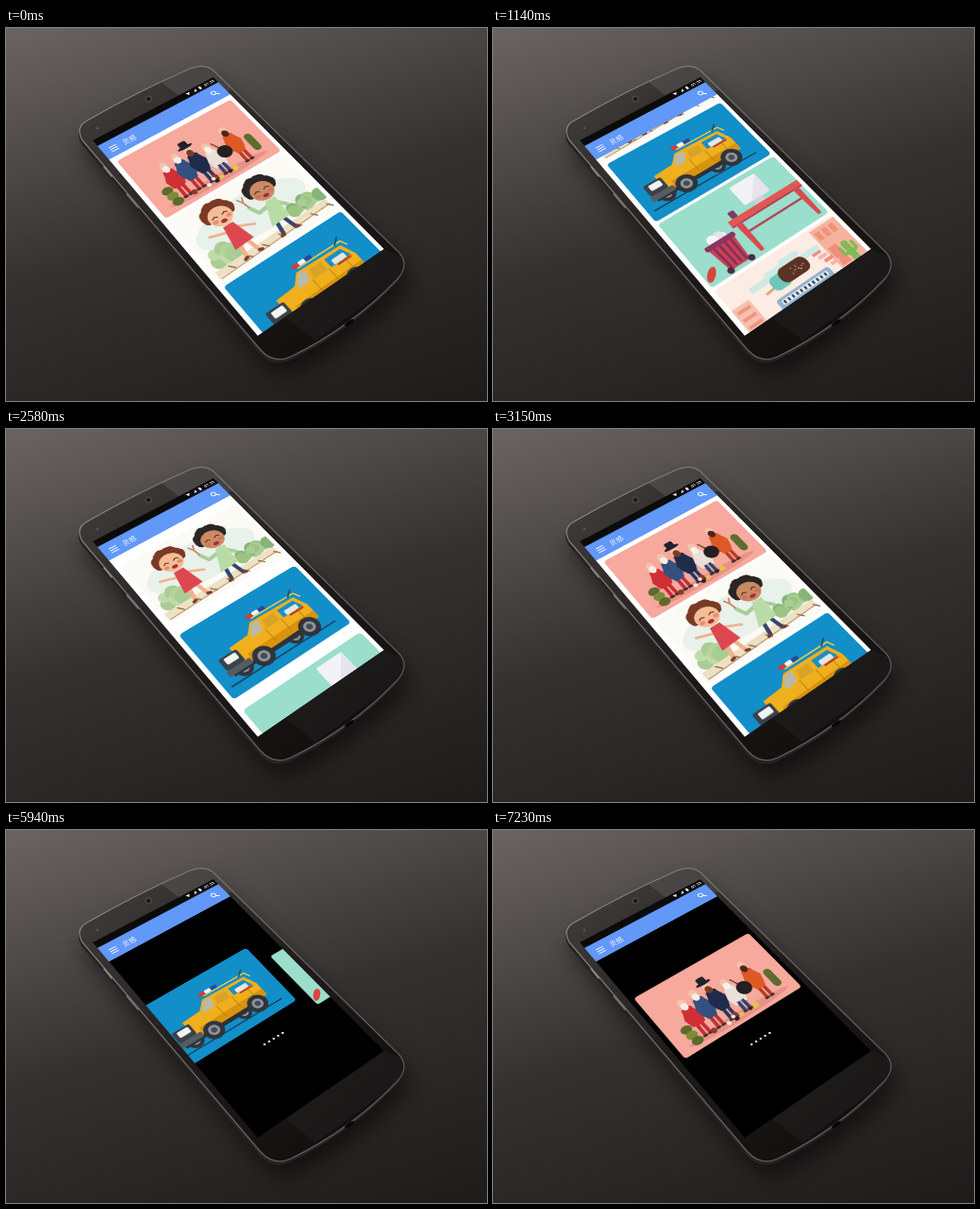
These frames come from a looping animation (510 by 395 pixels, 7.29 s). An HTML page with a canvas:

```html
<!DOCTYPE html>
<html lang="zh">
<head>
<meta charset="utf-8">
<style>
html, body { margin: 0; width: 100%; height: 100%; overflow: hidden; background: #34312f; }
canvas { position: absolute; left: 0; top: 0; display: block; }
#screen { transform-origin: 0 0; }
</style>
</head>
<body>
<canvas id="stage" width="510" height="395"></canvas>
<canvas id="screen" width="225" height="400"></canvas>
<script>
const LOOP = 7290, STEP = 30;
const W = 360, H = 640, ZOOM = 0.625;
const UNIT = 3.37, CARD_H = 203, TOP = 86, PITCH = 209.3, SCROLL = 407, CENTER = 312.5;
const BOTH = [-1, 1];
const screenEl = document.getElementById('screen');
let c = document.getElementById('stage').getContext('2d');

// drawing helpers
function box(col, x, y, w, h, r = 0) {
  c.fillStyle = col;
  c.beginPath();
  c.roundRect(x, y, w, h, r);
  c.fill();
}
function oval(col, x, y, rx, ry = rx, rot = 0) {
  c.fillStyle = col;
  c.beginPath();
  c.ellipse(x, y, rx, ry, rot, 0, 7);
  c.fill();
}
function trace(p) {
  c.beginPath();
  for (let i = 0; i < p.length; i += 2) c.lineTo(p[i], p[i + 1]);
}
function poly(col, ...p) {
  trace(p);
  c.fillStyle = col;
  c.fill();
}
function line(col, w, ...p) {
  trace(p);
  c.strokeStyle = col;
  c.lineWidth = w;
  c.lineCap = c.lineJoin = 'round';
  c.stroke();
}
function times(n, f) {
  for (let i = 0; i < n; i++) f(i);
}
function gradient(x0, y0, x1, y1, ...cols) {
  const g = c.createLinearGradient(x0, y0, x1, y1);
  cols.forEach((col, i) => g.addColorStop(i / (cols.length - 1), col));
  return g;
}
function random(seed) {
  return () => (seed = seed * 16807 % 2147483647) / 2147483647;
}
function scatter(cols, n, seed, x, y, rx, ry, size) {
  const rnd = random(seed);
  times(n, i => {
    const a = rnd() * 7, d = Math.sqrt(rnd());
    oval(cols[i % cols.length], x + rx * d * Math.cos(a), y + ry * d * Math.sin(a), size * (0.7 + 0.6 * rnd()));
  });
}

// phone
function bodyPath() {
  c.beginPath();
  c.moveTo(81, 119);
  c.quadraticCurveTo(73, 105, 86, 98);
  c.quadraticCurveTo(140, 67, 195, 43);
  c.quadraticCurveTo(212, 36, 222, 47);
  c.lineTo(417, 238);
  c.quadraticCurveTo(428, 251, 415, 266);
  c.quadraticCurveTo(366, 317, 302, 348);
  c.quadraticCurveTo(284, 356, 270, 341);
  c.closePath();
}
function drawPhone() {
  c.fillStyle = gradient(0, 0, 158, 502, '#6a6562', '#34312f', '#1e1c1b');
  c.fillRect(0, 0, 510, 395);

  c.save();
  c.shadowColor = 'rgba(0,0,0,.55)';
  c.shadowBlur = 24;
  c.shadowOffsetX = 6;
  c.shadowOffsetY = 12;
  c.translate(-1, 4);
  bodyPath();
  c.fillStyle = '#262322';
  c.fill();
  c.restore();

  bodyPath();
  c.fillStyle = gradient(130, 60, 350, 330, '#3d3937', '#1f1c1b', '#12100f');
  c.fill();
  c.save();
  c.clip();
  poly('rgba(255,255,255,.09)', 163, 56, 184, 72, 240, 66, 207, 30);
  poly('rgba(255,255,255,.03)', 296, 306, 328, 331, 440, 250, 401, 234);
  c.restore();
  bodyPath();
  c.strokeStyle = gradient(75, 100, 425, 270, '#8c8784', '#6b6765', '#5c5856');
  c.lineWidth = 1.2;
  c.stroke();

  line('#8d8986', 1.6, 104, 147, 112, 157);
  line('#777371', 1.6, 128, 176, 140, 190);
  oval('#4a4644', 151, 75, 4, 3.4);
  oval('#191718', 151, 75, 2.4, 2);
  oval('#575250', 97, 106, 1.5);
  oval('#050505', 364, 312, 6, 1.8, -0.6);
}

// card illustrations on a 100 x 60 field
function man(x, head, coat, legs, beard) {
  for (const s of BOTH) {
    line(legs, 2.6, x + s * 1.8, 41, x + s * 2, 51);
    box('#4a2a2a', x + s * 2.1 - 1.9, 52, 3.8, 2, 1);
    line(coat, 2.4, x + s * 3, head + 8, x + s * 5.5, head + 14, x + s * 4, head + 20);
  }
  box(coat, x - 4.2, head + 5, 8.4, 39 - head, 2);
  oval('#f2c4a8', x, head + 1, 3, 3.8);
  oval(beard, x, head + 4, 2.6, 3.2);
}
function party() {
  box('#f6a99c', 0, 0, 100, 60);
  oval('rgba(196,92,84,.3)', 50, 54, 42, 3.5);
  man(24, 22, '#cf2f35', '#c92b33', '#f4eeea');
  man(35, 20, '#34507f', '#b8333a', '#f4eeea');
  man(46, 20, '#1f2b4a', '#27395f', '#7b3b22');
  man(58, 25, '#e9e1d8', '#2c4670', '#f7f2ee');
  man(77, 20, '#dd5a26', '#b93a24', '#4f241b');
  oval('#22202a', 46, 17.5, 6, 1.4);
  box('#22202a', 42.8, 12, 6.4, 5.5, 1.5);
  line('#7a4a30', 1.2, 63, 26, 67, 36);
  oval('#231f22', 67, 37, 5.6);
  box('#5d6c2f', 85.5, 33, 6, 17, 3);
  times(3, i => oval(i % 2 ? '#7c8b3a' : '#5c6b2c', 14 + i * 0.6, 42 + i * 5.6, 4.2, 3.4));
  scatter(['#e8c14c', '#f1ede6', '#2a2426', '#8a3a2c'], 8, 5, 48, 53, 20, 2, 2);
}

function kid(x, hip, hair, skin, shirt, legs) {
  for (const s of BOTH) {
    line(legs, 3, hip + s * 3, 43, hip + s * 5, 53);
    line('#7c3c30', 2.4, hip + s * 5, 54, hip + s * 7, 54.5);
  }
  poly(shirt, x - 4, 26, x + 4, 26, hip + 8, 44, hip - 8, 45);
  times(13, i => {
    const a = Math.PI * (0.95 + i * 0.092);
    oval(hair, x + 9 * Math.cos(a), 15 + 7.5 * Math.sin(a), 3.4 + i % 3 * 0.5);
  });
  oval(skin, x, 17.5, 9, 8);
  for (const s of BOTH) {
    oval('rgba(226,90,80,.5)', x + s * 5.5, 20, 2, 1.5);
    line('#5d2b1d', 0.8, x + s * 4 - 2, 17, x + s * 4, 16, x + s * 4 + 2, 17);
  }
  oval('#a52f34', x, 22, 2.4, 1.5);
}
function friends() {
  box('#fbfaf5', 0, 0, 100, 60);
  oval('#e8f1ea', 50, 28, 45, 17);
  scatter(['#b4d39a', '#a9cd94', '#c0dba8'], 14, 3, 15, 43, 9, 7, 5);
  scatter(['#a9cd94', '#86b57a', '#9bc483'], 16, 8, 85, 42, 13, 4, 4.5);
  poly('#eee0c2', 2, 51, 98, 48, 98, 53, 2, 57);
  line('#b08f63', 0.7, 3, 57, 98, 53);
  times(7, i => line('#8f6d48', 1, 12 + i * 14, 52, 15 + i * 14, 55.5));
  line('#f0b28c', 2, 15, 27, 27, 31, 36, 31, 46, 36);
  kid(31, 31, '#7a3a24', '#f4bd98', '#dd4850', '#f0b28c');
  line('#a9cf96', 3, 74, 36, 68, 29, 54, 31, 51, 24);
  for (const s of BOTH) line('#c58662', 1.2, 51, 23, 50, 18, 50 + s * 2, 14);
  kid(67, 62, '#2b2524', '#c98a65', '#b9dba6', '#34466b');
}

function wheel(x, y, r) {
  oval('#30343a', x, y, r);
  oval('#8f959a', x, y, r * 0.56);
  oval('#454b52', x, y, r * 0.3);
}
function truck() {
  box('#128ec8', 0, 0, 100, 60);
  line('#16364d', 0.9, 5, 52, 92, 52.5);
  c.translate(-5.5, 0);
  c.scale(1.06, 1.03);
  wheel(24, 44, 6);
  wheel(64, 45, 5.5);
  poly('#2d3238', 14, 36, 34, 38, 82, 40, 82, 46, 16, 46);
  poly('#f0b01d', 25, 27, 40, 26, 47, 19, 82, 20, 86, 30, 86, 42, 31, 43, 25, 38);
  poly('#d9930f', 32, 37, 86, 36, 86, 42, 31, 43);
  poly('#bcb9a4', 42, 26, 47, 20.5, 53, 20.5, 50, 29, 42, 29);
  poly('#d9a32a', 55, 22, 64, 22, 64, 29, 53, 29);
  poly('#198fc4', 67, 22, 80, 22, 83, 29, 67, 29);
  box('#e2e7e8', 70, 25, 10, 4, 1);
  line('#f7cf45', 1, 50, 17, 84, 17.5, 86, 22);
  times(3, i => {
    box(['#d83a34', '#f4f4f4', '#29479e'][i], 47 + i * 5, 13.5, 5, 3, 0.8);
    line('#b9820f', 0.6, 52 + i * 13, 29, 52 + i * 13, 40);
  });
  line('#b83a33', 1.4, 72, 30, 82, 30);
  line('#2d4b4a', 1, 79, 18, 84, 14);
  box('#3a4148', 14, 30, 14, 10, 1.5);
  box('#f2f4f2', 17, 31.5, 9, 5, 1);
  box('#555c63', 13, 40, 18, 4.5, 1);
  for (const x of [39, 76]) wheel(x, 44.5, 7.4);
}

function office() {
  box('#9adecb', 0, 0, 100, 60);
  box('#f3f2f6', 57, 4, 22, 18, 1.5);
  poly('#e6e5ed', 79, 4, 79, 22, 63, 22);
  box('#cfd0da', 64, 22, 8, 4);
  box('#7a3d68', 43, 20, 5, 6, 1);
  box('#e2574f', 39, 26, 61, 4.5, 0.5);
  box('#b93f57', 39, 30.5, 61, 1.6);
  for (const x of [42, 92]) poly('#d84b4f', x, 31, x + 5, 31, x + 4, 57, x + 1, 57);
  line('#b93f57', 1.6, 47, 40, 92, 40);
  scatter(['#f7f5f8', '#e7e2ec'], 7, 4, 25, 32, 7, 2, 3.5);
  poly('#c93f55', 15, 36, 36, 36, 34, 57, 18, 57);
  times(4, i => line('#7b2f5c', 1.6, 19 + i * 4.5, 38, 20 + i * 4, 55));
  box('#8c3462', 13.5, 33.5, 24, 4, 1.5);
  for (const x of [18, 35]) oval('#4d2749', x, 57, 2.5);
  oval('#d9443f', 6, 52, 6, 2.8, -0.75);
}

function street() {
  box('#fdece4', 0, 0, 100, 60);
  box('#f5b39e', 78, 2, 22, 34);
  times(3, i => box('#ef937d', 80 + i * 6, 5, 4, 7));
  box('#ef8f7b', 80, 19, 7, 16);
  times(4, i => box(i % 2 ? '#f6b6a4' : '#ee8e7a', 68 + i * 2, 16 + i * 4, 7, 2.6));
  box('#f7bfae', 0, 18, 14, 40);
  times(6, i => box('#ee9681', 2, 21 + i * 6, 10, 2.4));
  times(4, i => box('#cdeae3', 18 + i * 14, 12 - i % 3 * 2.5, 16, 4.5, 2.2));
  line('#d9a877', 1.8, 26, 22, 34, 21);
  box('#6fc7b9', 32, 14, 14, 11, 4);
  box('#5a3226', 40, 12, 23, 12, 5);
  scatter(['#e9a0a0', '#f2d9b0'], 10, 6, 52, 18, 8, 4, 0.5);
  box('#8fb2cf', 27, 29, 44, 10, 2);
  box('#eef4f7', 30, 31, 38, 3.6, 1);
  times(11, i => box('#3f4858', 31 + i * 3.4, 31.6, 1.6, 2.4));
  box('#ee8e7a', 24, 39, 50, 21);
  times(6, i => box('#fbdccf', 27 + i * 8, 42, 4, 16));
  box('#7dbb54', 89, 20, 5, 19, 2.5);
  for (const s of BOTH) line('#7dbb54', 2.4, 91.5, 31, 91.5 + s * 5, 29, 91.5 + s * 5, 24);
}
const art = [party, friends, truck, office, street];

// motion
function ease(x) {
  if (x <= 0) return 0;
  if (x >= 1) return 1;
  let lo = 0, hi = 1, s = 0.5;
  for (let i = 0; i < 16; i++) {
    s = (lo + hi) / 2;
    const u = 1 - s;
    if (1.2 * u * u * s + 0.6 * u * s * s + s * s * s < x) lo = s; else hi = s;
  }
  return s * s * (3 - 2 * s);
}
function swing(x) {
  if (x <= 0) return 0;
  if (x >= 1) return 1;
  return x < 0.5 ? (2 * x) ** 2.4 / 2 : 1 - (2 - 2 * x) ** 2.4 / 2;
}
const SWIPES = [[4680, 390], [5340, 300], [5850, 300], [6420, 270], [6960, 270]];
const page = t => SWIPES.reduce((sum, [at, len]) => sum + swing((t - at) / len), 0);
const scrolled = (t, i) => t < 2100
  ? ease((t - 90 - 30 * i) / 1000)
  : 1 - ease((t - 2130 - 30 * (4 - i)) / 1000);

function card(i, x, y, scale = 1) {
  c.save();
  c.translate(x, y);
  c.scale(UNIT * scale, UNIT * scale);
  c.beginPath();
  c.roundRect(-50, -30, 100, 60, 2.6);
  c.clip();
  c.translate(-50, -30);
  art[i]();
  c.restore();
}
function drawList(t, open) {
  const shade = Math.round(255 * (1 - Math.min(1, open * 1.2)));
  box(`rgb(${shade},${shade},${shade})`, 0, 0, W, H);
  for (let i = 4; i >= 0; i--) {
    const rest = TOP + PITCH * i - SCROLL * scrolled(t, i) + CARD_H / 2;
    const y = i ? rest + 560 * open : rest + (CENTER - rest) * open;
    if (y > -110 && y < H + 110) card(i, 180.5, y);
  }
}
function drawPager(t) {
  box('#000', 0, 0, W, H);
  const pos = page(t), n = Math.floor(pos + 1e-6), p = Math.max(0, pos - n);
  const place = (i, d) =>
    card(i % 5, 180.5 + 336 * d, CENTER + 66 * Math.abs(d), 1 - 0.13 * Math.min(1, 3 * Math.abs(d)));
  place(n, -p);
  if (p > 0) place(n + 1, 1 - p);
}
function drawBar() {
  box('#6298f8', 0, 20, W, 52);
  box('#0b0b0b', 0, 0, W, 21);
  times(3, i => box('#fff', 18, 41 + i * 7, 20, 2.4));
  c.fillStyle = '#fff';
  c.textBaseline = 'middle';
  c.textAlign = 'center';
  c.font = '18px "Noto Sans CJK SC", "Noto Sans CJK", sans-serif';
  c.fillText('灵感', 72, 49);
  c.font = '500 12.5px Roboto, sans-serif';
  c.fillText('07:53', 339, 10);
  poly('#fff', 268, 6, 280, 6, 274, 14);
  poly('#fff', 298, 5, 298, 14, 289, 14);
  box('#fff', 307, 5, 6, 10, 1);
  c.strokeStyle = '#fff';
  c.lineWidth = 2.8;
  c.beginPath();
  c.arc(327, 44, 6, 0, 7);
  c.stroke();
  line('#fff', 3, 331.5, 48.5, 338, 55);
}
function drawScreen(t) {
  c.setTransform(ZOOM, 0, 0, ZOOM, 0, 0);
  const open = ease((t - 3450) / 800);
  if (t < 4680) drawList(t, open); else drawPager(t);
  c.globalAlpha = Math.max(0, open * 2 - 1);
  times(5, i => oval('#fff', 180 + (i - 2) * 13, 469, 2.7));
  c.globalAlpha = 1;
  drawBar();
}

// maps the flat screen onto the four corners of the display
function placeScreen([x0, y0], [x1, y1], [x2, y2], [x3, y3]) {
  const w = screenEl.width, h = screenEl.height;
  const ax = x1 - x2, ay = y1 - y2, bx = x3 - x2, by = y3 - y2;
  const sx = x0 - x1 + x2 - x3, sy = y0 - y1 + y2 - y3;
  const det = ax * by - bx * ay;
  const g = (sx * by - bx * sy) / det, k = (ax * sy - sx * ay) / det;
  const m = [
    (x1 - x0 + g * x1) / w, (y1 - y0 + g * y1) / w, 0, g / w,
    (x3 - x0 + k * x3) / h, (y3 - y0 + k * y3) / h, 0, k / h,
    0, 0, 1, 0,
    x0, y0, 0, 1
  ];
  screenEl.style.transform = `matrix3d(${m.map(v => v.toFixed(8)).join(',')})`;
}

drawPhone();
placeScreen([92, 119], [220, 52], [401, 234], [267, 326]);
c = screenEl.getContext('2d');
const start = performance.now();
function tick() {
  const t = (performance.now() - start) % LOOP;
  drawScreen(Math.floor(t / STEP) * STEP);
  requestAnimationFrame(tick);
}
tick();
</script>
</body>
</html>
```
